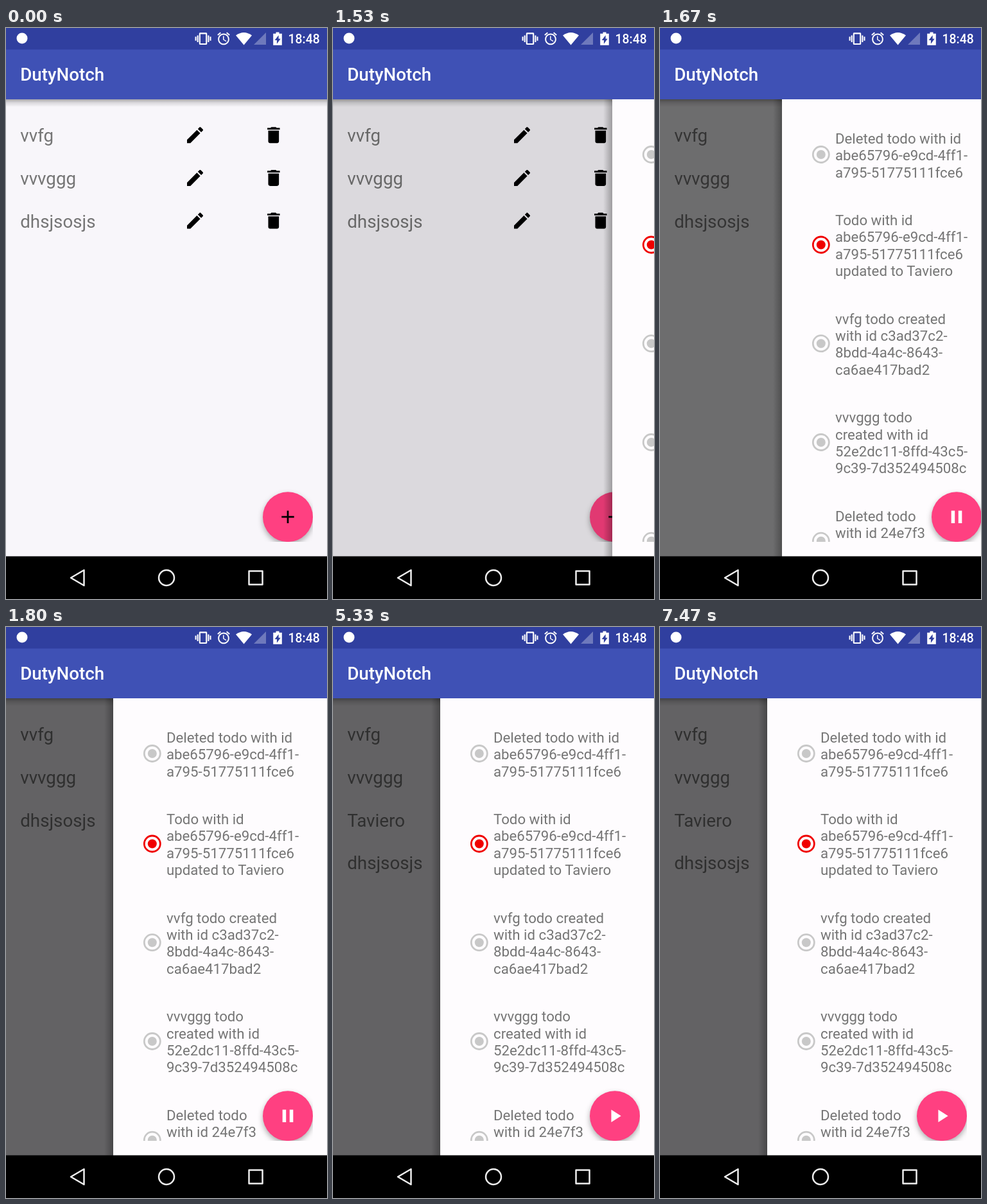
Write an HTML page that moves like this. It is 500 px wide and 889 px high and loops after 8000 ms.

```html
<!DOCTYPE html>
<html lang="en">
<head>
<meta charset="utf-8">
<title>Task list</title>
<style>
html, body { margin: 0; width: 100%; height: 100%; overflow: hidden; background: #000; }
svg { display: block; width: 100vw; height: 100vh; font-family: Roboto, sans-serif; }
.title { font-size: 27.78px; font-weight: 500; fill: #fff; }
.clock { font-size: 19.4px; font-weight: 500; fill: #fff; }
.todo { font-size: 27.78px; fill: #757575; }
.event { font-size: 22.22px; fill: #757575; }
.fab { fill: #ff4081; filter: drop-shadow(0 4px 4px rgba(0, 0, 0, .32)); }
.nav { fill: none; stroke: #eee; stroke-width: 2.5; stroke-linejoin: round; }
</style>
</head>
<body>
<svg viewBox="0 0 500 889">
  <defs>
    <linearGradient id="barShade" x2="0" y2="1">
      <stop offset="0" stop-color="#000" stop-opacity=".32"/>
      <stop offset=".45" stop-color="#000" stop-opacity=".12"/>
      <stop offset="1" stop-color="#000" stop-opacity="0"/>
    </linearGradient>
    <linearGradient id="edgeShade">
      <stop offset="0" stop-color="#000" stop-opacity="0"/>
      <stop offset="1" stop-color="#000" stop-opacity=".28"/>
    </linearGradient>
    <clipPath id="content"><rect x="-20" width="498" height="800"/></clipPath>
  </defs>

  <rect y="111" width="500" height="712" fill="#f8f6fa"/>
  <g id="before"></g>
  <g id="after"></g>
  <g id="addButton" clip-path="url(#content)"></g>
  <rect y="111" width="500" height="12" fill="url(#barShade)"/>
  <rect id="scrim" y="111" width="500" height="712"/>

  <g id="drawer">
    <rect x="-14" y="111" width="14" height="712" fill="url(#edgeShade)"/>
    <rect y="111" width="500" height="712" fill="#fefcfe"/>
    <!-- content is laid out for the fully open position -->
    <g transform="translate(-167)">
      <g id="drawerContent" clip-path="url(#content)"></g>
    </g>
  </g>

  <rect y="33" width="500" height="78" fill="#3f51b5"/>
  <text class="title" x="22.2" y="82.3">DutyNotch</text>
  <g id="status" fill="#fff">
    <rect width="500" height="33.5" fill="#303f9f"/>
    <circle cx="25" cy="16" r="8.5"/>
    <path d="M358 11.5Q370.5 2.5 383 11.5L370.5 26.5z"/>
    <path d="M405 7V26H386z" opacity=".3"/>
    <path d="M420.5 6.5h5v2.3h4.3V26.8h-13.6V8.8h4.3z"/>
    <path d="M424.6 11.2v5.5h3.1l-5.8 8v-5.8h-3.3z" fill="#303f9f"/>
    <text class="clock" x="439.5" y="24">18:48</text>
  </g>

  <rect y="822.5" width="500" height="67"/>
  <g class="nav">
    <path d="M121.5 844V868L101 856z"/>
    <circle cx="250" cy="856" r="12"/>
    <rect x="378.5" y="845.5" width="21" height="21"/>
  </g>
</svg>

<script>
const LOOP = 8000, UPDATED = 3870, CLOSED_X = 500, OPEN_X = 167;
const SLIDE = [[1530, 435], [1600, 258], [1670, 190], [1730, 172], [1800, OPEN_X]];

const ICONS = {
  edit: 'M3 17.25V21h3.75L17.81 9.94l-3.75-3.75L3 17.25zM20.71 7.04c.39-.39.39-1.02 0-1.41l-2.34-2.34c-.39-.39-1.02-.39-1.41 0l-1.83 1.83 3.75 3.75 1.83-1.83z',
  remove: 'M6 19c0 1.1.9 2 2 2h8c1.1 0 2-.9 2-2V7H6v12zM19 4h-3.5l-1-1h-5l-1 1H5v2h14V4z',
  add: 'M19 13h-6v6h-2v-6H5v-2h6V5h2v6h6v2z',
  pause: 'M6 19h4V5H6v14zm8-14v14h4V5h-4z',
  play: 'M8 5v14l11-7z',
  vibrate: 'M0 15h2V9H0v6zm3 2h2V7H3v10zm19-8v6h2V9h-2zm-3 8h2V7h-2v10zM16.5 3h-9C6.67 3 6 3.67 6 4.5v15c0 .83.67 1.5 1.5 1.5h9c.83 0 1.5-.67 1.5-1.5v-15c0-.83-.67-1.5-1.5-1.5zM16 19H8V5h8v14z',
  alarm: 'M22 5.72l-4.6-3.86-1.29 1.53 4.6 3.86L22 5.72zM7.88 3.39L6.6 1.86 2 5.71l1.29 1.53 4.59-3.85zM12.5 8H11v6l4.75 2.85.75-1.23-4-2.37V8zM12 4c-4.97 0-9 4.03-9 9s4.02 9 9 9 9-4.03 9-9-4.03-9-9-9zm0 16c-3.87 0-7-3.13-7-7s3.13-7 7-7 7 3.13 7 7-3.13 7-7 7z'
};

// Events: centre of the radio mark, first baseline, lines of text
const EVENTS = [
  [197, 179.8, ['Deleted todo with id', 'abe65796-e9cd-4ff1-', 'a795-51775111fce6']],
  [337.5, 307, ['Todo with id', 'abe65796-e9cd-4ff1-', 'a795-51775111fce6', 'updated to Taviero']],
  [491.2, 460.7, ['vvfg todo created', 'with id c3ad37c2-', '8bdd-4a4c-8643-', 'ca6ae417bad2']],
  [645, 614.4, ['vvvggg todo', 'created with id', '52e2dc11-8ffd-43c5-', '9c39-7d352494508c']],
  [798.7, 768.1, ['Deleted todo', 'with id 24e7f3']]
];

const el = id => document.getElementById(id);
const fill = (id, markup) => el(id).insertAdjacentHTML('beforeend', markup);

const icon = (name, cx, cy, color, scale = 1.389) =>
  `<path d="${ICONS[name]}" fill="${color}" transform="translate(${cx} ${cy}) scale(${scale}) translate(-12 -12)"/>`;

const todoRow = (label, i) => {
  const y = 166.7 + i * 66.7;
  return `<text class="todo" x="22.2" y="${y + 10.6}">${label}</text>` +
    icon('edit', 294.5, y, '#000') + icon('remove', 416.8, y, '#000');
};

const eventRow = ([cy, baseline, lines], i) => {
  const color = i === 1 ? '#f00000' : '#c8c8c8';
  return `<circle cx="227.8" cy="${cy}" r="12.5" fill="none" stroke="${color}" stroke-width="2.78"/>` +
    `<circle cx="227.8" cy="${cy}" r="7" fill="${color}"/>` +
    lines.map((line, n) => `<text class="event" x="250" y="${baseline + n * 26.35}">${line}</text>`).join('');
};

const fab = '<circle class="fab" cx="439" cy="761.2" r="39"/>';

fill('before', ['vvfg', 'vvvggg', 'dhsjsosjs'].map(todoRow).join(''));
fill('after', ['vvfg', 'vvvggg', 'Taviero', 'dhsjsosjs'].map(todoRow).join(''));
fill('addButton', fab + icon('add', 439, 761.2, '#000'));
fill('drawerContent', EVENTS.map(eventRow).join('') + fab +
  `<g id="pause">${icon('pause', 439, 761.2, '#fff')}</g>` +
  `<g id="play">${icon('play', 439, 761.2, '#fff')}</g>`);
fill('status', icon('vibrate', 307, 16.7, '#fff', 1.04) + icon('alarm', 339, 16.4, '#fff', .98));

const show = (id, visible) => { el(id).style.display = visible ? '' : 'none'; };

function draw(t) {
  const x = SLIDE.reduce((last, [time, pos]) => t >= time ? pos : last, CLOSED_X);
  const updated = t >= UPDATED;
  el('drawer').setAttribute('transform', `translate(${x})`);
  show('drawer', x < CLOSED_X);
  el('scrim').setAttribute('opacity', .6 * (CLOSED_X - x) / (CLOSED_X - OPEN_X));
  show('before', !updated);
  show('after', updated);
  show('pause', !updated);
  show('play', updated);
}

const start = performance.now();
function tick() {
  draw((performance.now() - start) % LOOP);
  requestAnimationFrame(tick);
}
tick();
</script>
</body>
</html>
```
